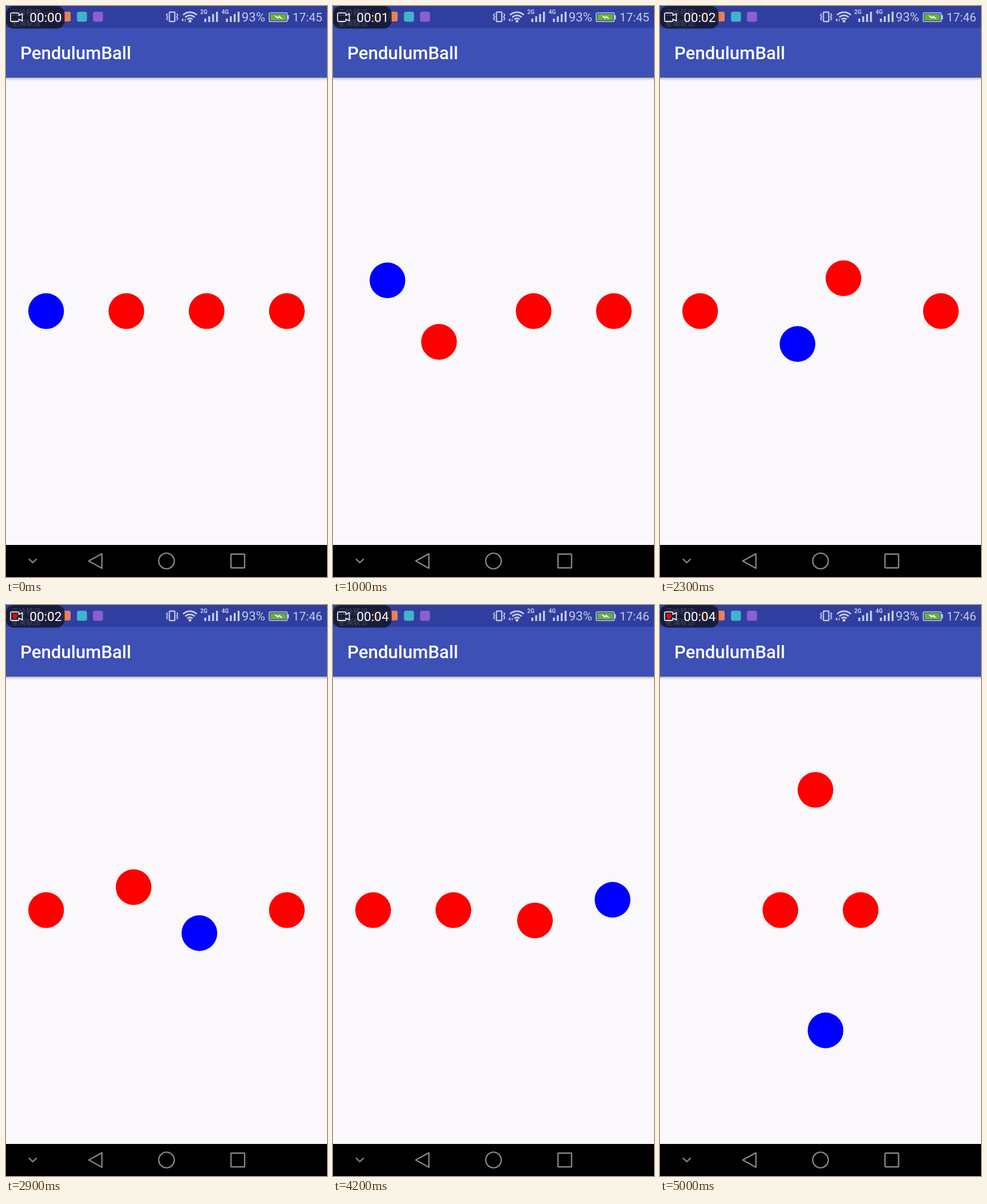
Recreate the animation shown at these times as an HTML page. Size 561 by 998 pixels, loop 5100 ms.

```html
<!DOCTYPE html>
<html lang="en">
<head>
<meta charset="utf-8">
<title>PendulumBall</title>
<style>
html, body { margin: 0; width: 100%; height: 100%; overflow: hidden; background: #faf8fb; }
svg { display: block; width: 100vw; height: 100vh; }
text { font-family: Roboto, sans-serif; }
.carrier { font: 13px "Noto Sans CJK SC", "Noto Sans CJK", sans-serif; fill: #484a56; }
.net { font-size: 10px; font-weight: 700; }
</style>
</head>
<body>
<svg viewBox="0 0 561 998">
  <defs>
    <linearGradient id="shade" x1="0" y1="0" x2="0" y2="1">
      <stop offset="0" stop-color="#000" stop-opacity=".36"/>
      <stop offset=".4" stop-color="#000" stop-opacity=".12"/>
      <stop offset="1" stop-color="#000" stop-opacity="0"/>
    </linearGradient>
    <path id="bars" d="M0 22h3.4v6h-3.4zM6.8 18h3.4v10h-3.4zM13.6 14h3.4v14h-3.4zM20.4 10h3.4v18h-3.4z"/>
  </defs>

  <rect width="561" height="998" fill="#faf8fb"/>
  <rect y="125" width="561" height="6" fill="url(#shade)"/>
  <rect y="37" width="561" height="88" fill="#3c50b5"/>
  <rect width="561" height="38" fill="#303f9f"/>
  <text x="24.9" y="93" font-size="31.2" font-weight="500" fill="#fff">PendulumBall</text>

  <!-- notification icons and recorder pill -->
  <rect x="68" y="10" width="17" height="17" rx="3" fill="#e8703c"/>
  <rect x="96" y="10" width="17" height="17" rx="3" fill="#e8805c"/>
  <rect x="124" y="10" width="17.5" height="17.5" rx="3.5" fill="#3fb4cc"/>
  <rect x="152" y="10" width="17.5" height="17.5" rx="3.5" fill="#8a5fd3"/>
  <rect width="102.5" height="39.5" rx="14" fill="#14172f" fill-opacity=".88"/>
  <text class="carrier" x="9" y="16">云岭移讯</text>
  <text class="carrier" x="9" y="34">星澜联信</text>
  <path d="M9.5 12.2h11.5q1.5 0 1.5 1.5v2.8l6-3v12.5l-6-3v2.6q0 1.5-1.5 1.5H9.5q-1.5 0-1.5-1.5V13.7q0-1.5 1.5-1.5z" fill="none" stroke="#fff" stroke-width="1.6"/>
  <circle id="dot" cx="15.4" cy="19.6" r="4.5" fill="#f00"/>
  <text id="timer" x="41.2" y="28" font-size="22.6" fill="#fff"></text>

  <!-- system status -->
  <g fill="#c7cbe6">
    <g fill="none" stroke="#c7cbe6" stroke-width="2.2">
      <rect x="285.6" y="10.6" width="9.4" height="16.6" rx="1"/>
      <path d="M282.5 13l-2 3 2 3-2 3 2 3M298.2 13l2 3-2 3 2 3-2 3" stroke-width="1.8"/>
      <path d="M309.5 15.8a17 17 0 0 1 24 0M313.3 19.8a11.6 11.6 0 0 1 16.4 0M317 23.6a6.3 6.3 0 0 1 9 0" stroke-width="2.8"/>
    </g>
    <circle cx="321.5" cy="26.5" r="2.5"/>
    <path id="traffic" d="M310 21.5v6l-3.6-3zM312.4 22.5h1.4v4.6h-1.4z"/>
    <text class="net" x="339.6" y="14">2G</text>
    <text class="net" x="376.8" y="14">4G</text>
    <use href="#bars" x="346.6"/>
    <use href="#bars" x="384.4"/>
    <text x="411.8" y="27.3" font-size="22.3">93%</text>
    <text id="clock" x="500.8" y="27.3" font-size="20.9"></text>
    <rect x="460" y="12" width="31.5" height="15.2" rx="2" fill="none" stroke="#c7cbe6" stroke-width="1.6"/>
    <rect x="492" y="16" width="2.4" height="7.4"/>
    <rect x="462" y="14" width="27.5" height="11.2" fill="#66b03c"/>
    <path d="M468.5 16.2l8.2 2.8.8-2.5 6.5 6.6-8-2.7-.8 2.3z" fill="#f4f8f0"/>
  </g>

  <g id="balls"></g>

  <rect y="942" width="561" height="56"/>
  <g fill="none" stroke="#858585" stroke-width="2.4" stroke-linejoin="round">
    <path d="M40 966.4l6.8 6.6 6.8-6.6"/>
    <path d="M167.6 957.4v25.4L144.6 970z"/>
    <circle cx="280.5" cy="970" r="13.6"/>
    <rect x="393.2" y="958" width="23.8" height="24" rx="1"/>
  </g>
</svg>
<script>
const LOOP = 5100, STEP = 100, MID = 533.3;
const slots = [1, 3, 5, 7].map(n => n * 561 / 8);
// the blue ball trades places with another: slots, direction of turn, start, duration
const swaps = [
  { from: 0, to: 1, dir: 1, start: 660, span: 1223 },
  { from: 1, to: 2, dir: -1, start: 1933, span: 1200 },
  { from: 2, to: 3, dir: 1, start: 3150, span: 1145 },
  { from: 3, to: 0, dir: 1, start: 4416, span: 1200 },
];
const $ = id => document.getElementById(id);
const balls = slots.map((_, i) => {
  const c = document.createElementNS("http://www.w3.org/2000/svg", "circle");
  c.setAttribute("r", 31.2);
  c.setAttribute("fill", i ? "#f00" : "#00f");
  return $("balls").appendChild(c);
});

function place(ball, x, y) {
  ball.setAttribute("cx", x);
  ball.setAttribute("cy", y);
}

function show(id, on) {
  $(id).style.display = on ? "" : "none";
}

function draw(t) {
  const order = [0, 1, 2, 3];
  slots.forEach((x, i) => place(balls[i], x, MID));
  for (const { from, to, dir, start, span } of swaps) {
    if (t < start) break;
    const turn = dir * Math.PI * Math.min(1, (t - start) / span);
    const mid = (slots[from] + slots[to]) / 2, arm = (slots[from] - slots[to]) / 2;
    const dx = arm * Math.cos(turn), dy = arm * Math.sin(turn);
    place(balls[order[from]], mid + dx, MID + dy);
    place(balls[order[to]], mid - dx, MID - dy);
    [order[from], order[to]] = [order[to], order[from]];
  }
  const sec = (t + 400) / 1150, part = sec % 1;
  $("timer").textContent = "00:0" + Math.floor(sec);
  $("clock").textContent = t < 1600 ? "17:45" : "17:46";
  show("dot", part > 0.37 && part < 0.92);
  show("traffic", t < 2600 || t >= 3200);
}

function tick() {
  draw(Math.floor(performance.now() % LOOP / STEP) * STEP);
  requestAnimationFrame(tick);
}
tick();
</script>
</body>
</html>
```
